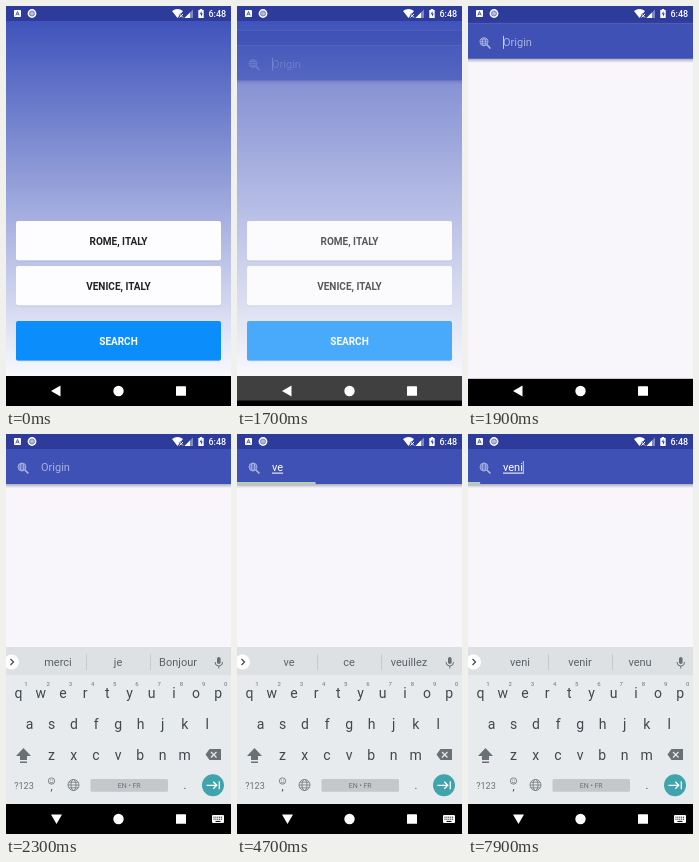
Animation, 225 px wide and 400 px high, one loop 8 s. Source, as an HTML page:

```html
<!DOCTYPE html>
<html lang="en">
<head>
<meta charset="utf-8">
<title>City search</title>
<style>
html, body { margin: 0; width: 100%; height: 100%; overflow: hidden; background: #000; }
svg { display: block; width: 100%; height: 100%; font-family: Roboto, sans-serif; }
</style>
</head>
<body>
<svg id="stage" viewBox="0 0 225 400">
  <defs>
    <linearGradient id="sky" x1="0" y1="0" x2="0" y2="1">
      <stop offset="0" stop-color="#3f53bb"/><stop offset="1" stop-color="#f8f9fd"/>
    </linearGradient>
    <linearGradient id="shade" x1="0" y1="0" x2="0" y2="1">
      <stop offset="0" stop-color="#30365c" stop-opacity=".38"/><stop offset="1" stop-color="#30365c" stop-opacity="0"/>
    </linearGradient>
    <clipPath id="aboveNav"><rect width="225" height="370"/></clipPath>
  </defs>
  <rect width="225" height="400"/>
  <g id="home"></g>
  <g id="page">
    <rect width="225" height="370" fill="#f8f6fa"/>
    <g id="list"></g>
    <rect y="50" width="225" height="4" fill="url(#shade)"/>
    <rect width="225" height="15" fill="#303f9f"/>
    <rect y="15" width="225" height="35" fill="#3f51b5"/>
    <g fill="none" stroke="#b4bce2" stroke-width=".8">
      <circle cx="16" cy="33" r="4"/><ellipse cx="16" cy="33" rx="1.8" ry="4"/>
      <path d="M12 33h8M12.8 31h6.4M12.8 35h6.4"/>
      <path d="M19 36l3.4 3.6" stroke-width="1.5"/>
    </g>
    <g id="field"></g>
    <rect id="line" x="35" y="38.6" height="1" fill="#fff"/>
    <rect id="caret" y="27" width="1" height="13" fill="#c9cfee"/>
    <rect id="bar" y="48" height="2.5" fill="#b9cfb4"/>
  </g>
  <g clip-path="url(#aboveNav)"><g id="keys"></g></g>
  <rect width="225" height="15" fill="#2d3b9b"/>
  <g id="status" fill="#fff">
    <rect x="8" y="4" width="7" height="7" rx=".8"/>
    <path d="M9.8 9.5l1.7-4 1.7 4M10.5 8.2h2" fill="none" stroke="#303f9f" stroke-width=".8"/>
    <circle cx="26" cy="7.5" r="4.4"/><circle cx="26" cy="7.5" r="2.6" fill="#b3b9dc" stroke="#5664b0" stroke-width=".7"/>
    <path d="M166 5q5.5-4 11 0l-5.500 7z"/>
    <path d="M173.500 8l3.500 3.500m0-3.500l-3.500 3.500" stroke="#303f9f" stroke-width="2.200"/>
    <path d="M173.500 8l3.500 3.500m0-3.500l-3.500 3.500" stroke="#fff"/>
    <path d="M178.500 12h8.500v-8.500z" fill-opacity=".4"/><path d="M178.500 12h5.500v-5.500z"/>
    <path d="M193.800 3h2.400v1h1.500v8h-5.400v-8h1.500z"/>
    <path d="M195.500 5l-1.800 3.300h1.300v2.500l1.800-3.400h-1.300z" fill="#303f9f"/>
  </g>
  <g id="nav" fill="#fff">
    <path id="back" d="M45 385l9.500-5.500v11z"/><path id="down" d="M45 380.500h11l-5.500 9.500z"/>
    <circle cx="112.500" cy="385" r="5.200"/><rect x="170" y="380.200" width="10" height="9.600" rx=".6"/>
    <g id="imeIcon"><rect x="206" y="381" width="12" height="8" rx="1"/>
      <path d="M207.500 383.200h9M207.500 385.200h9" stroke="#000" stroke-dasharray="1 .9"/>
      <path d="M209.500 387.400h5" stroke="#000"/></g>
  </g>
</svg>
<script>
const LOOP = 8000;
const $ = id => document.getElementById(id);

function text(x, y, str, size, fill, anchor = 'middle', weight = 400) {
  return `<text x="${x}" y="${y}" font-size="${size}" fill="${fill}" text-anchor="${anchor}" font-weight="${weight}">${str}</text>`;
}

function button(y, label, fill, color) {
  return `<rect x="10" y="${y + .8}" width="205" height="39.500" rx="2" fill="#6070a8" fill-opacity=".3"/>
    <rect x="10" y="${y}" width="205" height="39.500" rx="2" fill="${fill}"/>` +
    text(112.5, y + 23.7, label, 10, color, 'middle', 700);
}

$('home').innerHTML = '<rect y="15" width="225" height="355" fill="url(#sky)"/>' +
  button(215, 'ROME, ITALY', '#fdfdff', '#222') +
  button(260, 'VENICE, ITALY', '#fdfdff', '#222') +
  button(315, 'SEARCH', '#0b8efb', '#fff');

$('status').innerHTML += text(202.5, 10.8, '6:48', 9, '#fff', 'start', 500);

$('list').innerHTML = ['St. Petersburg, Russia', 'Moscow, Russia', 'Sochi, Russia', 'Budapest, Hungary']
  .map((city, i) => text(10, 74 + i * 40, city, 10, '#222', 'start')).join('');

const INK = '#41474b', SOFT = '#6a7175';

function keyRow(letters, x, y) {
  return [...letters].map((c, i) => text(x + i * 22.2, y, c, 14, INK)).join('');
}

$('keys').innerHTML = `
  <rect y="213" width="225" height="157" fill="#e8ebee"/>
  <rect y="213" width="225" height="28" fill="#dee1e3"/>
  <circle cx="5.500" cy="228" r="7.500" fill="#fff"/>
  <path d="M4.500 225l3 3-3 3" fill="none" stroke="${INK}" stroke-width="1.200"/>
  <path d="M80.500 220v16M144.500 220v16" stroke="#c6cacd"/>
  <g id="words"></g>
  <rect x="211" y="223" width="3.600" height="7" rx="1.800" fill="${SOFT}"/>
  <path d="M209 228q0 4 3.800 4t3.800-4M212.800 232v2.500" fill="none" stroke="${SOFT}"/>` +
  keyRow('qwertyuiop', 12.5, 263.5) + keyRow('asdfghjkl', 23.5, 294.5) + keyRow('zxcvbnm', 45.5, 325.5) +
  [...'1234567890'].map((d, i) => text(20 + i * 22.2, 252, d, 6, SOFT)).join('') + `
  <path d="M17.500 314l7.500 8h-4v4h-7v-4h-4zM14 327.500h7v1.500h-7z" fill="${SOFT}"/>
  <path d="M203.500 315h11.500v11h-11.500l-4-5.500z" fill="${SOFT}"/>
  <path d="M205 318l5.500 5.500m0-5.500l-5.500 5.500" stroke="#e8ebee" stroke-width="1.200"/>
  <g fill="none" stroke="${SOFT}" stroke-width=".8">
    <circle cx="45.500" cy="347" r="3.200"/><path d="M43.800 348q1.700 1.800 3.400 0M44.400 345.500v1M46.600 345.500v1"/>
    <circle cx="67.500" cy="351" r="5.500"/><ellipse cx="67.500" cy="351" rx="2.500" ry="5.500"/>
    <path d="M62 351h11M62.800 348.200h9.400M62.800 353.800h9.400"/>
  </g>
  <rect x="84.500" y="345" width="77.500" height="12.800" rx="1.500" fill="#c4c8cb"/>
  <circle cx="207" cy="351.300" r="11" fill="#3fa4ab"/>
  <path d="M200.500 351.300h10M207.300 347.800l3.500 3.500-3.500 3.500M213.300 347.300v8" fill="none" stroke="#fff" stroke-width="1.300"/>` +
  text(18, 354.5, '?123', 9, SOFT) + text(45.5, 355.5, ',', 11, INK) +
  text(123.2, 354.2, 'EN • FR', 7, SOFT) + text(179, 354.5, '.', 11, INK);

$('field').innerHTML = text(35, 37, '', 11, '#fff', 'start');
const input = $('field').firstChild;

// [start, typed text, three suggestions]
const typing = [
  [0, '', 'merci', 'je', 'Bonjour'],
  [3100, 'v', 'v', 'vous', 'va'],
  [3300, 've', 've', 'ce', 'veuillez'],
  [6400, 'ven', 'ven', 'vent', 'venu'],
  [6600, 'veni', 'veni', 'venir', 'venu']
];
const caretOn = [[1670, 2200], [2700, 3700], [4200, 4700], [5300, 5800], [6300, 7100], [7600, LOOP]];
const barOn = [[4200, 4850], [7600, LOOP]];

const clamp = v => Math.min(1, Math.max(0, v));
const prog = (t, start, span) => clamp((t - start) / span);
const within = (t, spans) => spans.find(([a, b]) => t >= a && t < b);
const show = (id, on) => $(id).setAttribute('visibility', on ? 'visible' : 'hidden');

function track(p, points) {
  const i = Math.max(1, points.findIndex(q => q[0] >= p));
  const [x0, y0] = points[i - 1], [x1, y1] = points[i];
  return y0 + (y1 - y0) * (p - x0) / (x1 - x0);
}

let current = null;
function setTyped(step) {
  if (step === current) return;
  current = step;
  const [, typed, ...words] = step;
  input.textContent = typed || 'Origin';
  input.setAttribute('fill-opacity', typed ? 1 : .55);
  const width = typed ? input.getComputedTextLength() : 0;
  $('line').setAttribute('width', width);
  $('caret').setAttribute('x', 35 + width);
  $('words').innerHTML = words.map((w, i) => text(52 + i * 60, 232.3, w, 11, '#5a6165')).join('');
}

function drawBar(t) {
  const span = within(t, barOn);
  let left = 0, right = 0;
  if (span) {
    const p = (t - span[0]) / 2000;
    left = -.549 + track(p, [[0, 0], [.25, .3765], [.4835, .8438], [1, 1.6027]]);
    right = left + track(p, [[0, .08], [.1915, .457], [.4415, .727], [1, .08]]);
  }
  left = clamp(left);
  $('bar').setAttribute('x', left * 225);
  $('bar').setAttribute('width', Math.max(0, clamp(right) - left) * 225);
}

function draw(t) {
  const rise = 32 * (1 - prog(t, 1670, 600)) ** 5;
  $('page').setAttribute('transform', `translate(0 ${rise})`);
  $('page').setAttribute('opacity', prog(t, 1670, 120));
  const drop = 157 * (1 - prog(t, 1980, 290)) ** 3;
  $('keys').setAttribute('transform', `translate(0 ${drop})`);
  show('keys', t >= 1980);
  show('down', t >= 2000);
  show('back', t < 2000);
  show('imeIcon', t >= 2000);
  setTyped(typing.filter(s => t >= s[0]).pop());
  show('caret', within(t, caretOn));
  $('list').setAttribute('opacity', t < 6400 ? prog(t, 4780, 120) : 0);
  drawBar(t);
}

function tick() {
  draw(performance.now() % LOOP);
  requestAnimationFrame(tick);
}
tick();
</script>
</body>
</html>
```
